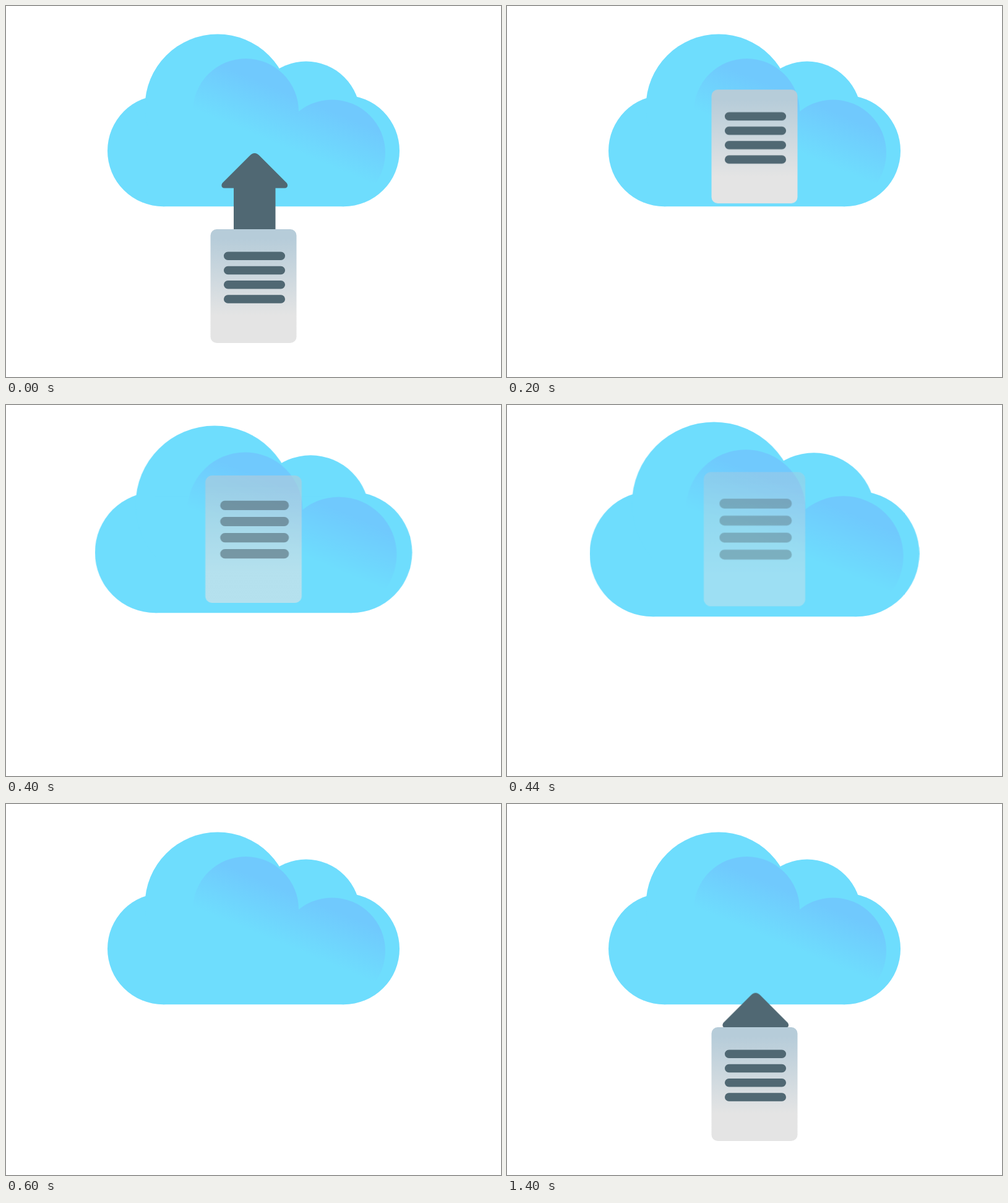
Recreate the animation shown at these times as an HTML page. Size 800 by 600 pixels, loop 1440 ms.

```html
<!DOCTYPE html>
<html lang="en">
<head>
<meta charset="utf-8">
<title>Cloud upload</title>
<style>
  html, body { margin: 0; width: 100%; height: 100%; overflow: hidden; background: #fff; }
  svg { display: block; width: 100vw; height: 100vh; }
  #cloud { transform-origin: 400px 184.7px; }
  #page { transform-origin: 400px 453px; }
</style>
</head>
<body>
<svg viewBox="0 0 800 600">
  <defs>
    <linearGradient id="shade" gradientUnits="userSpaceOnUse" x1="472" y1="147" x2="440" y2="224">
      <stop offset="0" stop-color="#70c9fd"/>
      <stop offset="1" stop-color="#6eddfd"/>
    </linearGradient>
    <linearGradient id="paper" x1="0" y1="0" x2="0" y2="1">
      <stop offset="0.08" stop-color="#b6ccd9"/>
      <stop offset="0.76" stop-color="#e4e4e4"/>
    </linearGradient>
  </defs>

  <g id="cloud">
    <g fill="#6eddfd">
      <circle cx="254" cy="234.2" r="90"/>
      <circle cx="546" cy="234.2" r="90"/>
      <circle cx="342" cy="163" r="117.5"/>
      <circle cx="485" cy="177" r="87.5"/>
      <rect x="254" y="150" width="292" height="174.2"/>
    </g>
    <g fill="url(#shade)">
      <circle cx="387.5" cy="170.5" r="85.5"/>
      <circle cx="527" cy="237.5" r="86"/>
    </g>
  </g>

  <path id="arrow" fill="#506873" d="M394 242Q401.8 234.2 409.6 242L453 285.5
    C456.5 289 455.5 294.5 450.5 294.5H435.5V361.5H368V294.5H353
    C348 294.5 347 289 350.5 285.5Z"/>

  <g id="page">
    <rect x="330.5" y="361" width="139" height="184" rx="10" fill="url(#paper)"/>
    <path d="M358.7 404.2h85.6m-85.6 23.3h85.6m-85.6 23.3h85.6m-85.6 23.3h85.6"
      stroke="#506873" stroke-width="13.5" stroke-linecap="round"/>
  </g>
</svg>
<script>
const LOOP = 1440, STEP = 40;

// Progress from 0 to 1 between two times.
const ramp = (t, from, to) => Math.min(1, Math.max(0, (t - from) / (to - from)));
const easeOut = p => 1 - (1 - p) ** 3.2;
const backOut = p => 1 + 2.7 * (p - 1) ** 3 + 1.7 * (p - 1) ** 2;

function play(id, pose) {
  const frames = [];
  for (let t = 0; t <= LOOP; t += STEP) {
    frames.push({ offset: t / LOOP, easing: 'step-end', ...pose(t % LOOP) });
  }
  document.getElementById(id).animate(frames, { duration: LOOP, iterations: Infinity });
}

play('cloud', t => {
  const swell = ramp(t, 320, 440) - ramp(t, 440, 600);
  return { transform: `scale(${1 + 0.129 * swell})` };
});

// The page rises and dissolves, then a new one pops in below.
play('page', t => {
  const fresh = t >= 600;
  const pop = backOut(ramp(t, 1120, 1320));
  const fade = ramp(t, 320, 520);
  const rise = fresh ? 0 : 236 * easeOut(ramp(t, 0, 320));
  const scale = fresh ? 0.68 + 0.32 * pop : 1 + 0.3 * fade;
  const alpha = fresh ? Math.min(1, Math.max(0, pop)) : 1 - fade;
  return {
    transform: `translateY(${-rise}px) scale(${scale})`,
    fillOpacity: alpha,
    strokeOpacity: alpha
  };
});

play('arrow', t => {
  const drop = t < 120 ? 0 : 135 * (1 - ramp(t, 1360, LOOP));
  return {
    transform: `translateY(${drop}px)`,
    opacity: t < 120 || t >= 1360 ? 1 : 0
  };
});
</script>
</body>
</html>
```
